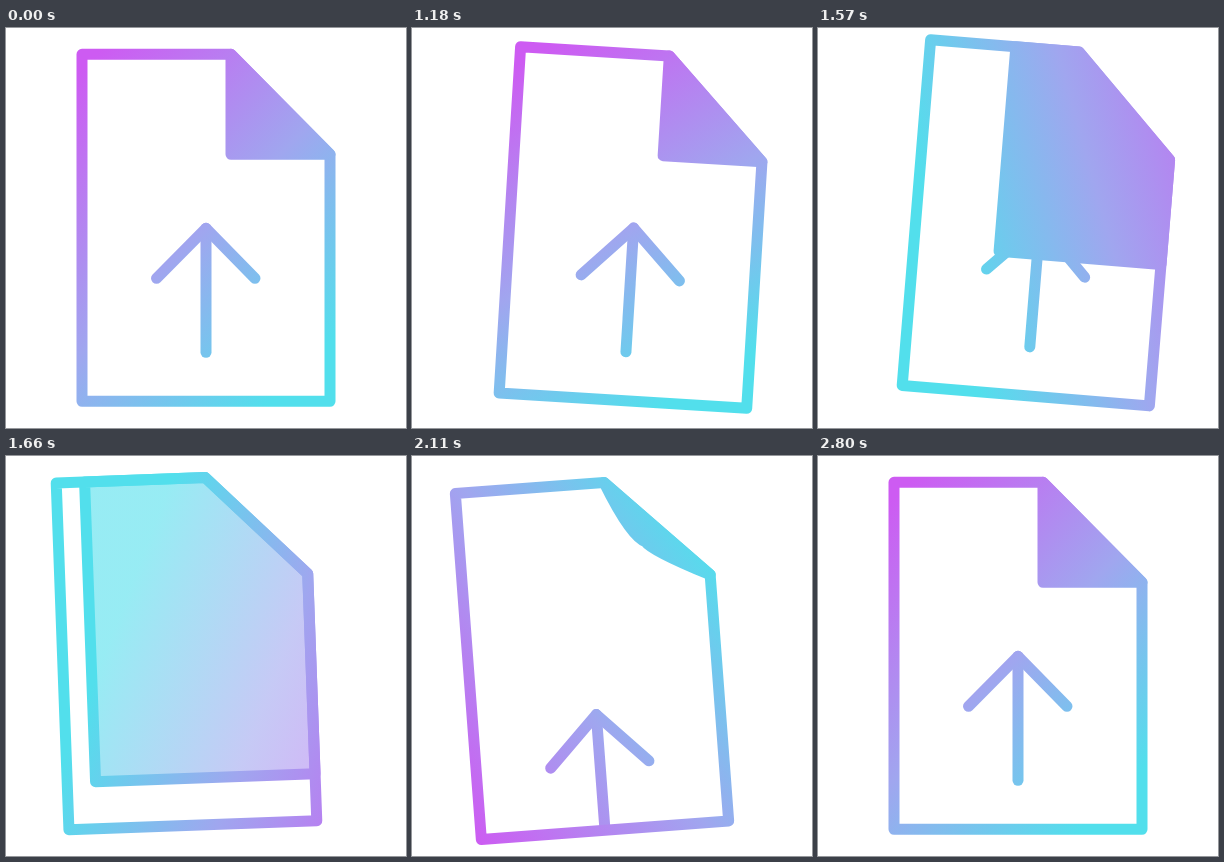
Animation of 400 by 400 pixels, one loop 2.83 s. Source, as an HTML page with a canvas:

```html
<!DOCTYPE html>
<html lang="en">
<head>
<meta charset="utf-8">
<title>Upload file</title>
<style>
html, body { margin: 0; width: 100%; height: 100%; overflow: hidden; background: #fff; }
canvas { display: block; }
</style>
</head>
<body>
<canvas id="stage" width="400" height="400"></canvas>
<script>
const ctx = document.getElementById('stage').getContext('2d');
const LOOP = 2830, START = 1030, STEP = 30;
const W = 248, H = 347, CUT_X = 149, CUT_Y = 100;

// time, x, y, tilt in degrees
const sway = [
  [1000, 0, 0, 0], [1420, 55, -1.3, 9], [1570, 22, -5, 4.7],
  [1660, -19.5, -4, -2.1], [1870, -39.5, 0.6, -6.7], [1960, -35, 2.5, -7.3],
  [2110, -20, 1.5, -4.3], [2350, 15, -6.8, 4.6], [2650, 5, -3.2, 2], [2800, 0, 0, 0]
];
// time, gradient angle in degrees, shift of its centre
const tint = [
  [1000, 45, 0], [1420, 95, 0], [1660, 203, 92],
  [1870, 268, 20], [2350, 372, 0], [2800, 405, 0]
];

const clamp = v => Math.min(1, Math.max(0, v));
const span = (t, a, b) => clamp((t - a) / (b - a));
const smooth = u => u * u * (3 - 2 * u);
const easeOut = u => 1 - (1 - u) * (1 - u);
const mix = (a, b, u) => a + (b - a) * u;
const rad = d => d * Math.PI / 180;

// Monotone cubic interpolation of one column of keys
function track(keys, col, t) {
  const last = keys.length - 1;
  if (t <= keys[0][0]) return keys[0][col];
  if (t >= keys[last][0]) return keys[last][col];
  const slope = i => (keys[i + 1][col] - keys[i][col]) / (keys[i + 1][0] - keys[i][0]);
  const tangent = i => {
    if (i === 0 || i === last) return 0;
    const a = slope(i - 1), b = slope(i);
    return a * b <= 0 ? 0 : 2 * a * b / (a + b);
  };
  const i = keys.findIndex(k => k[0] > t) - 1;
  const h = keys[i + 1][0] - keys[i][0], u = (t - keys[i][0]) / h;
  return mix(keys[i][col], keys[i + 1][col], smooth(u))
    + h * u * (1 - u) * ((1 - u) * tangent(i) - u * tangent(i + 1));
}

function paint(t) {
  const angle = rad(track(tint, 1, t)), shift = track(tint, 2, t);
  const dx = Math.cos(angle), dy = Math.sin(angle);
  const cx = W / 2 - dx * shift, cy = H / 2 - dy * shift;
  const g = ctx.createLinearGradient(cx - dx * 200, cy - dy * 200, cx + dx * 200, cy + dy * 200);
  g.addColorStop(0, '#cd5bf2');
  g.addColorStop(0.5, '#a0a6ef');
  g.addColorStop(0.92, '#52dfec');
  return g;
}

function poly(points, closed) {
  ctx.beginPath();
  points.forEach(p => ctx.lineTo(...p));
  if (closed) ctx.closePath();
}

function drawArrow(drop) {
  ctx.save();
  ctx.beginPath();
  ctx.rect(0, 0, W, H);
  ctx.clip();
  ctx.translate(0, drop);
  poly([[124, 298], [124, 174]]);
  ctx.stroke();
  poly([[74.5, 224], [124, 174], [173, 224]]);
  ctx.stroke();
  ctx.restore();
}

function fillAndStroke(alpha) {
  const color = ctx.fillStyle;
  ctx.fillStyle = '#fff';
  ctx.fill();
  ctx.fillStyle = color;
  ctx.globalAlpha = alpha;
  ctx.fill();
  ctx.globalAlpha = 1;
  ctx.stroke();
}

// The folded corner grows until it covers the page
function drawSheet(t) {
  const p = smooth(span(t, 1420, 1753));
  const x = CUT_X * (1 - p), y = mix(CUT_Y, H, p);
  poly([[CUT_X, 0], [x, 0], [x, y], [W, y], [W, CUT_Y]], true);
  fillAndStroke(1 - span(t, 1580, 1780));
}

// A new corner curls over from the diagonal
function drawCurl(t) {
  const q = easeOut(span(t, 2050, 2500));
  const mx = (CUT_X + W) / 2, my = CUT_Y / 2, bend = 25 * q * (1 - q);
  const at = (x, y) => [mix(mx, x, q), mix(my, y, q)];
  const [kx, ky] = at(CUT_X, CUT_Y);
  const [ax, ay] = at(CUT_X, 80), [bx, by] = at(170, CUT_Y);
  ctx.beginPath();
  ctx.moveTo(CUT_X, 0);
  ctx.quadraticCurveTo(ax - 3 * bend, ay, kx, ky);
  ctx.quadraticCurveTo(bx, by + 2 * bend, W, CUT_Y);
  ctx.closePath();
  fillAndStroke(1);
}

function draw(t) {
  ctx.setTransform(1, 0, 0, 1, 0, 0);
  ctx.fillStyle = '#fff';
  ctx.fillRect(0, 0, 400, 400);
  ctx.translate(200 + track(sway, 1, t), 199.8 + track(sway, 2, t));
  ctx.rotate(rad(track(sway, 3, t)));
  ctx.translate(-W / 2, -H / 2);
  ctx.fillStyle = ctx.strokeStyle = paint(t);
  ctx.lineWidth = 11;
  ctx.lineCap = ctx.lineJoin = 'round';

  drawArrow(t < 1755 ? 0 : 180 * (1 - easeOut(span(t, 1760, 2560))));
  if (t < 1780) drawSheet(t);
  else if (t > 2050) drawCurl(t);
  poly([[0, 0], [CUT_X, 0], [W, CUT_Y], [W, H], [0, H]], true);
  ctx.stroke();
}

function frame() {
  const t = performance.now() % LOOP;
  draw(t < START ? 0 : START + Math.floor((t - START) / STEP) * STEP);
  requestAnimationFrame(frame);
}
frame();
</script>
</body>
</html>
```
